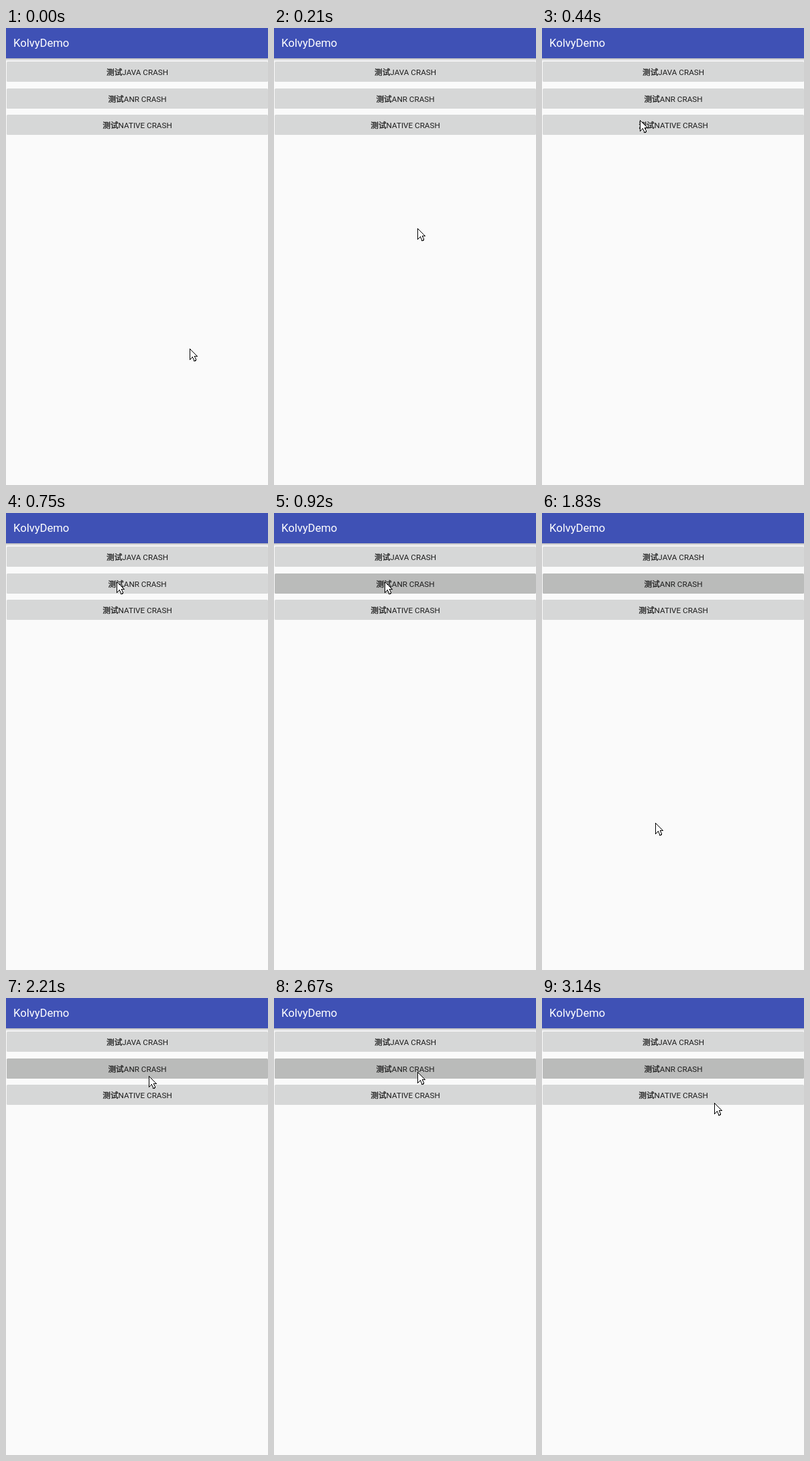
An HTML page that plays this animation: 391 px wide and 680 px high, repeating every 8 s.

```html
<!DOCTYPE html>
<html lang="zh-CN">
<head>
<meta charset="utf-8">
<style>
  html, body { margin: 0; width: 391px; height: 680px; overflow: hidden; background: #fafafa; }
  svg { display: block; }
  text { font: 11.7px Roboto, "Noto Sans CJK SC", "Noto Sans CJK", sans-serif; fill: #1c1c1c; }
  .title { font-size: 16.6px; fill: #fff; }
  .label { text-anchor: middle; }
  .han { stroke: #1c1c1c; stroke-width: .3px; }
</style>
</head>
<body>
<svg width="391" height="680" viewBox="0 0 391 680">
  <defs>
    <linearGradient id="shade" x2="0" y2="1">
      <stop stop-color="#000" stop-opacity=".27"/>
      <stop offset=".5" stop-color="#000" stop-opacity=".09"/>
      <stop offset="1" stop-color="#000" stop-opacity="0"/>
    </linearGradient>
  </defs>
  <rect y="45" width="391" height="5" fill="url(#shade)"/>
  <rect width="391" height="45" fill="#3f51b5"/>
  <text class="title" x="11" y="28">KolvyDemo</text>
  <g id="buttons"></g>
  <path id="cursor" fill="#fff" stroke="#000" shape-rendering="crispEdges"
    d="M.5 .5V16.5L4.5 12.5L7 18.5H8.5L9.5 16.5L7.5 11.5H11.5Z"/>
</svg>
<script>
  const LOOP = 8000, PRESS = 920;
  const HOME = [274, 477];
  // Pointer strokes: the tip follows a quadratic curve in `hops` jumps, first at `from`, last at `until`
  const strokes = [
    { from: 70, until: 440, hops: 6, bend: [170, 160], to: [146, 137] },
    { from: 520, until: 750, hops: 4, bend: [118, 106], to: [165, 102] },
    { from: 980, until: 1370, hops: 6, bend: [164, 330], to: [159, 520] },
    { from: 1830, until: 1830, hops: 1, bend: [164, 490], to: [169, 461] },
    { from: 1900, until: 2210, hops: 5, bend: [238, 116], to: [213, 116] },
    { from: 2440, until: 2670, hops: 4, bend: [213, 112], to: [214, 110] },
    { from: 2980, until: 3140, hops: 3, bend: [199, 105], to: [257, 156] }
  ];

  const buttons = document.getElementById('buttons');
  buttons.innerHTML = ['JAVA', 'ANR', 'NATIVE'].map((name, i) => {
    const y = Math.floor(50 + 39.7 * i + .3);
    return `<rect x="1" y="${y}" width="390" height="30" rx="1.6" fill="#d6d7d7"/>
      <text class="label" x="196" y="${y + 19.5}"><tspan class="han">测试</tspan>${name} CRASH</text>`;
  }).join('');
  const anr = buttons.querySelectorAll('rect')[1];
  const cursor = document.getElementById('cursor');
  const start = performance.now();

  function tipAt(t) {
    let tip = HOME;
    for (const { from, until, hops, bend, to } of strokes) {
      if (t < from) break;
      const gap = (until - from) / (hops - 1) || 1;
      const u = Math.min(hops, Math.floor((t - from) / gap + 1.02)) / hops;
      tip = tip.map((p, k) =>
        Math.round((1 - u) ** 2 * p + 2 * u * (1 - u) * bend[k] + u * u * to[k]));
    }
    return tip;
  }

  function draw() {
    const t = Math.max(0, performance.now() - start) % LOOP;
    cursor.setAttribute('transform', `translate(${tipAt(t)})`);
    anr.setAttribute('fill', t < PRESS ? '#d6d7d7' : '#babbba');
    requestAnimationFrame(draw);
  }
  draw();
</script>
</body>
</html>
```
